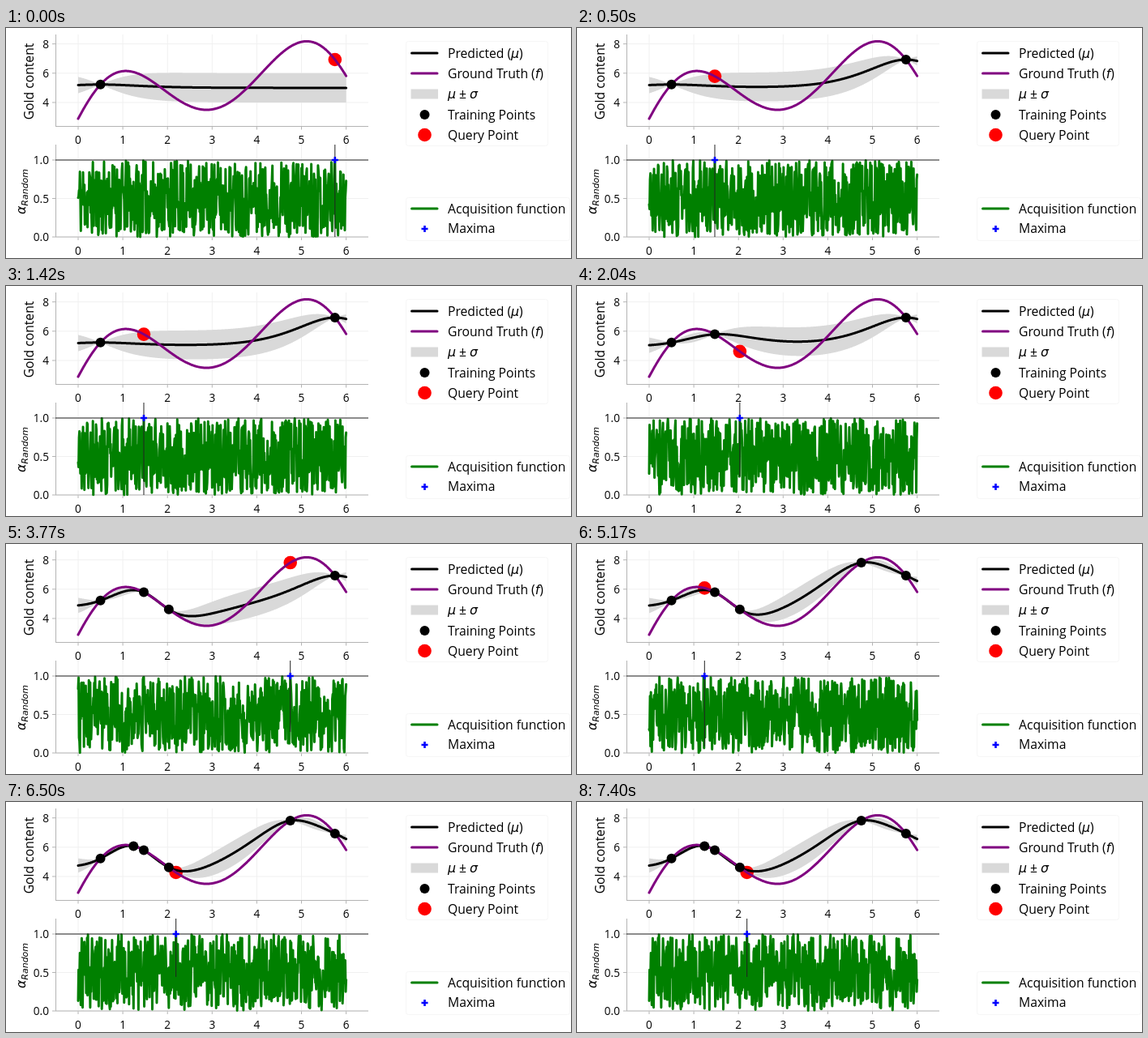
Recreate the animation shown at these times as an HTML page. Size 697 by 284 pixels, loop 8000 ms.

```html
<!DOCTYPE html>
<html>
<head>
<meta charset="utf-8">
<style>
html, body { margin: 0; width: 100%; height: 100%; overflow: hidden; background: #fff; }
svg { display: block; }
text { font: 500 15.7px "Open Sans", "Noto Sans", sans-serif; fill: #000; }
.tick { font-size: 13.6px; }
.math { font-family: "DejaVu Sans", sans-serif; font-style: italic; font-weight: 400; }
.line { fill: none; stroke-width: 3; stroke-linejoin: round; stroke-linecap: round; }
.mean { stroke: #000; }
.truth { stroke: #800080; }
.noise { stroke: #008000; }
.band { fill: #d9d9d9; }
.grid { stroke: #f0f0f0; }
.axis { stroke: #b4b4b4; }
.box { fill: #fff; stroke: #f6f6f6; }
</style>
</head>
<body>
<svg width="697" height="284" viewBox="0 0 697 284">
  <g id="axes"></g>
  <g id="plot"></g>
  <g id="legend"></g>
</svg>
<script>
const LOOP = 8000;
const starts = [0, 500, 2040, 3770, 5170, 6500];
const queries = [5.75, 1.47, 2.03, 4.75, 1.24, 2.19];
const probeEnds = [258, 258, 235, 232, 250, 216];
const N = 600;
const xs = Array.from({ length: N + 1 }, (_, i) => i * 6 / N);

const X = x => 89 + 55.1 * x;
const Y = y => 164.3 - 18.08 * y;
const A = a => 258 - 95 * a;
const $ = id => document.getElementById(id);

const points = (ys, scale) => ys.map((y, i) => X(xs[i]).toFixed(2) + "," + scale(y).toFixed(2));
const line = (pts, cls) => `<polyline class="line ${cls}" points="${pts.join(" ")}"/>`;
const seg = (x1, y1, x2, y2, cls) => `<path class="${cls}" d="M${x1} ${y1}L${x2} ${y2}"/>`;
const dot = (x, y, r, fill) => `<circle cx="${x}" cy="${y}" r="${r}" fill="${fill}"/>`;
const plus = (x, y) => `<path d="M${x - 4} ${y}h8M${x} ${y - 4}v8" stroke="#00f" stroke-width="2.6"/>`;
const label = (x, y, s, attrs = "") => `<text x="${x}" y="${y}" ${attrs}>${s}</text>`;
const math = s => `<tspan class="math">${s}</tspan>`;

// Ground truth: a sextic defined by its turning points, integrated with the midpoint rule.
const slope = x => -(x - 1.07) * (x - 2.87) * (x - 5.12) * (0.9408 - 0.06413 * (x - 3) ** 2) - 0.018;
function truth(x) {
  const n = 200, h = x / n;
  let y = 2.89;
  for (let i = 0; i < n; i++) y += slope((i + 0.5) * h) * h;
  return y;
}

// Gaussian process with a Matern 5/2 kernel, prior mean 5 and unit variance.
function kernel(a, b) {
  const s = Math.sqrt(5) * Math.abs(a - b);
  return (1 + s + s * s / 3) * Math.exp(-s);
}

function cholesky(m) {
  const L = m.map(r => r.map(() => 0));
  for (let i = 0; i < m.length; i++)
    for (let j = 0; j <= i; j++) {
      let s = m[i][j];
      for (let k = 0; k < j; k++) s -= L[i][k] * L[j][k];
      L[i][j] = i === j ? Math.sqrt(s) : s / L[j][j];
    }
  return L;
}

function forward(L, b) {
  const out = [];
  b.forEach((v, i) => {
    for (let k = 0; k < i; k++) v -= L[i][k] * out[k];
    out.push(v / L[i][i]);
  });
  return out;
}

const dotProduct = (a, b) => a.reduce((s, v, i) => s + v * b[i], 0);

function posterior(train) {
  const L = cholesky(train.map(a => train.map(b => kernel(a, b) + (a === b ? 1e-6 : 0))));
  const w = forward(L, train.map(x => truth(x) - 5));
  return xs.map(x => {
    const v = forward(L, train.map(t => kernel(x, t)));
    return { mu: 5 + dotProduct(v, w), sd: Math.sqrt(Math.max(0, 1 - dotProduct(v, v))) };
  });
}

function random(seed) {
  return () => {
    seed = (seed + 0x6D2B79F5) | 0;
    let t = Math.imul(seed ^ (seed >>> 15), 1 | seed);
    t = (t + Math.imul(t ^ (t >>> 7), 61 | t)) ^ t;
    return ((t ^ (t >>> 14)) >>> 0) / 4294967296;
  };
}

const truthLine = line(points(xs.map(truth), Y), "truth");

function scene(step) {
  const train = [0.5, ...queries.slice(0, step)];
  const q = queries[step], qx = X(q);
  const gp = posterior(train);
  const upper = points(gp.map(p => p.mu + p.sd), Y);
  const lower = points(gp.map(p => p.mu - p.sd), Y).reverse();
  const rnd = random(step * 97 + 11);
  const noise = xs.map(() => rnd() * 0.995);
  noise[Math.round(q * N / 6)] = 1;

  return `<polygon class="band" points="${[...upper, ...lower].join(" ")}"/>`
    + dot(qx, Y(truth(q)), 8.3, "#f00")
    + line(points(gp.map(p => p.mu), Y), "mean")
    + truthLine
    + train.map(x => dot(X(x), Y(truth(x)), 6, "#000")).join("")
    + line(points(noise, A), "noise")
    + `<path d="M61 163H447M${qx} 144V${probeEnds[step]}" stroke="#222" stroke-width="1"/>`
    + plus(qx, 163);
}

function axes() {
  let s = "";
  const panel = (top, bottom, ticks, scale, digits) => {
    for (let x = 0; x <= 6; x++) {
      s += seg(X(x), top, X(x), bottom, "grid") + seg(X(x), bottom, X(x), bottom + 4, "axis")
        + label(X(x), bottom + 21.5, x, 'class="tick" text-anchor="middle"');
    }
    for (const t of ticks) {
      const y = scale(t);
      s += seg(61, y, 447, y, "grid") + seg(57, y, 61, y, "axis")
        + label(53, y + 5, t.toFixed(digits), 'class="tick" text-anchor="end"');
    }
    s += seg(61.5, top, 61.5, bottom, "axis") + seg(61, bottom, 447, bottom, "axis");
  };
  panel(8, 121.5, [4, 6, 8], Y, 0);
  panel(144, 258, [0, 0.5, 1], A, 1);
  return s
    + label(0, 0, "Gold content", 'transform="translate(34 66) rotate(-90)" text-anchor="middle"')
    + label(0, 0, math("α") + '<tspan class="math" dy="3" font-size="11">Random</tspan>',
      'transform="translate(24 202) rotate(-90)" text-anchor="middle"');
}

function legend() {
  const box = (y, w, h) => `<rect class="box" x="493.5" y="${y}" width="${w}" height="${h}" rx="3"/>`;
  const key = (y, cls) => line([`500.5,${y}`, `532,${y}`], cls);
  return box(16.5, 175, 129) + box(209.5, 202, 53)
    + key(31, "mean") + label(545, 36.5, `Predicted (${math("μ")})`)
    + key(56, "truth") + label(545, 61.5, `Ground Truth (${math("f")})`)
    + '<rect class="band" x="499.5" y="75.5" width="33.5" height="12"/>' + label(545, 86.5, math("μ") + " ± " + math("σ"))
    + dot(516.5, 107, 6, "#000") + label(545, 112.5, "Training Points")
    + dot(516.5, 132, 8.3, "#f00") + label(545, 137.5, "Query Point")
    + key(223, "noise") + label(545, 228.5, "Acquisition function")
    + plus(516.5, 248) + label(545, 253, "Maxima");
}

$("axes").innerHTML = axes();
$("legend").innerHTML = legend();
const scenes = starts.map((_, i) => scene(i));
const begin = performance.now();
let shown = -1;

function draw() {
  const t = (performance.now() - begin) % LOOP;
  const step = starts.filter(s => s <= t).length - 1;
  if (step !== shown) $("plot").innerHTML = scenes[shown = step];
  requestAnimationFrame(draw);
}
draw();
</script>
</body>
</html>
```
